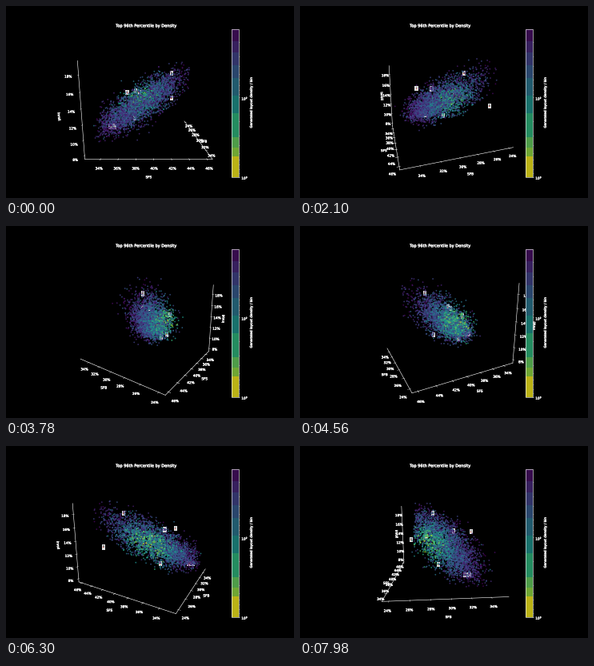
These frames come from a looping animation (360x240 px, 8000 ms). A matplotlib script:

```python
import numpy as np
import matplotlib.pyplot as plt
from matplotlib.animation import FuncAnimation
from matplotlib.cm import ScalarMappable
from matplotlib.colors import ListedColormap, LogNorm
from matplotlib.patheffects import withStroke
from matplotlib.text import Text

FRAMES, LOOP_MS, STEP = 134, 8000, 2.0
LOW, HIGH, ALPHA = 13.7, 1000, 0.78

plt.style.use("dark_background")
plt.rcParams.update({"font.family": "DejaVu Sans", "axes.linewidth": 1.4,
                     "ytick.major.width": 1.2, "ytick.minor.width": 1.2})

# Axis centres and half-ranges in percent; HALF is the box half-size in view units.
MID = np.array([29.57, 39.42, 13.54])
SPAN = np.array([6.215, 7.19, 6.075])
HALF = np.array([0.595, 0.595, 0.446])


def to_percent(p):
    return MID + np.asarray(p) * SPAN / HALF


def make_cloud(n, rng):
    """Elongated cloud, cut off at its low sides, densest on its low-SFB side."""
    axis = np.array([-0.34, 0.54, 0.33])
    t = rng.beta(2.0, 3.0, n)[:, None] * 2 - 1
    spread = rng.normal(0, 1, (n, 3)) * [0.135, 0.105, 0.1]
    pts = np.array([-0.05, 0.01, 0.045]) + axis * t + spread * (1 - 0.4 * t**2)
    floor = np.array([-0.37, -0.56, -0.4])
    pts = floor + np.abs(pts - floor)

    unit = axis / np.linalg.norm(axis)
    off = pts - [-0.2, -0.12, 0.0]
    along = off @ unit
    across = (off**2).sum(axis=1) - along**2
    core = np.exp(-(along / 0.42) ** 2 - across / 0.3**2)
    level = 0.11 + core * rng.uniform(0.1, 0.85, n) + rng.normal(0, 0.09, n)
    return to_percent(pts), LOW * (HIGH / LOW) ** np.clip(level, 0, 1)


def stepped_viridis():
    edges = np.array([0, 0.08, 0.16, 0.24, 0.33, 0.45, 0.57, 0.73, 0.8, 0.865, 1])
    shades = (edges[:-1] + edges[1:]) / 2
    shades[-1] = 0.98
    bins = np.digitize(np.linspace(0, 0.999, 256), edges) - 1
    return ListedColormap(plt.get_cmap("viridis")(shades[bins]))


fig = plt.figure(figsize=(12, 8), dpi=30)
ax = fig.add_subplot(projection="3d")
ax.set_proj_type("persp", focal_length=0.2)

norm = LogNorm(LOW, HIGH)
pts, density = make_cloud(3300, np.random.default_rng(4))
ax.scatter(*pts.T, c=density, cmap="viridis", norm=norm, s=10, alpha=ALPHA)

ax.set_title("Top 96th Percentile by Density", y=1 / 0.92)
ax.set(xlabel="SFB", ylabel="SFS", zlabel="Inroll")
lows, highs = MID - SPAN, MID + SPAN
ax.set_xlim(lows[0], highs[0])
ax.set_ylim(lows[1], highs[1])
ax.set_zlim(lows[2], highs[2])
for axis, first, last in ((ax.xaxis, 24, 34), (ax.yaxis, 34, 46), (ax.zaxis, 8, 18)):
    axis.set_ticks(range(first, last + 1, 2))
    axis.set_major_formatter("{x:.0f}%")
    axis.set_pane_color((0, 0, 0, 0))
ax.grid(False)

bar = fig.colorbar(ScalarMappable(norm, stepped_viridis()), ax=ax, alpha=ALPHA,
                   label="Generated layout density / bin")
bar.ax.invert_yaxis()

# A thin outline keeps the tiny text bright.
for text in fig.findobj(Text):
    text.set_path_effects([withStroke(linewidth=0.8, foreground="white")])

MARKS = [
    ("A", (-0.13, 0.29, 0.34)),
    ("B", (-0.442, 0.337, -0.032)),
    ("C", (0.291, -0.234, 0.143)),
    ("Basic", (0.185, -0.457, -0.27)),
    ("E", (0.105, -0.16, 0.14)),
    ("F", (-0.067, -0.188, -0.243)),
    ("G", (-0.209, -0.138, 0.08)),
]
box = dict(boxstyle="square,pad=0.4", fc="white", lw=0, alpha=0.88)
spots = to_percent([p for _, p in MARKS])
ax.scatter(*spots.T, c="#e0402c", s=3, depthshade=False)
for (name, _), spot in zip(MARKS, spots):
    ax.text(*spot, name, color="black", fontsize=7, va="center", bbox=box, zorder=0)


def draw(i):
    # The small offset avoids a tie when choosing which box edges carry the axes.
    ax.view_init(elev=10, azim=STEP * i + 0.01)
    return []


anim = FuncAnimation(fig, draw, frames=FRAMES, init_func=lambda: draw(0),
                     interval=LOOP_MS / FRAMES, repeat=True, repeat_delay=0)
plt.show()
```
